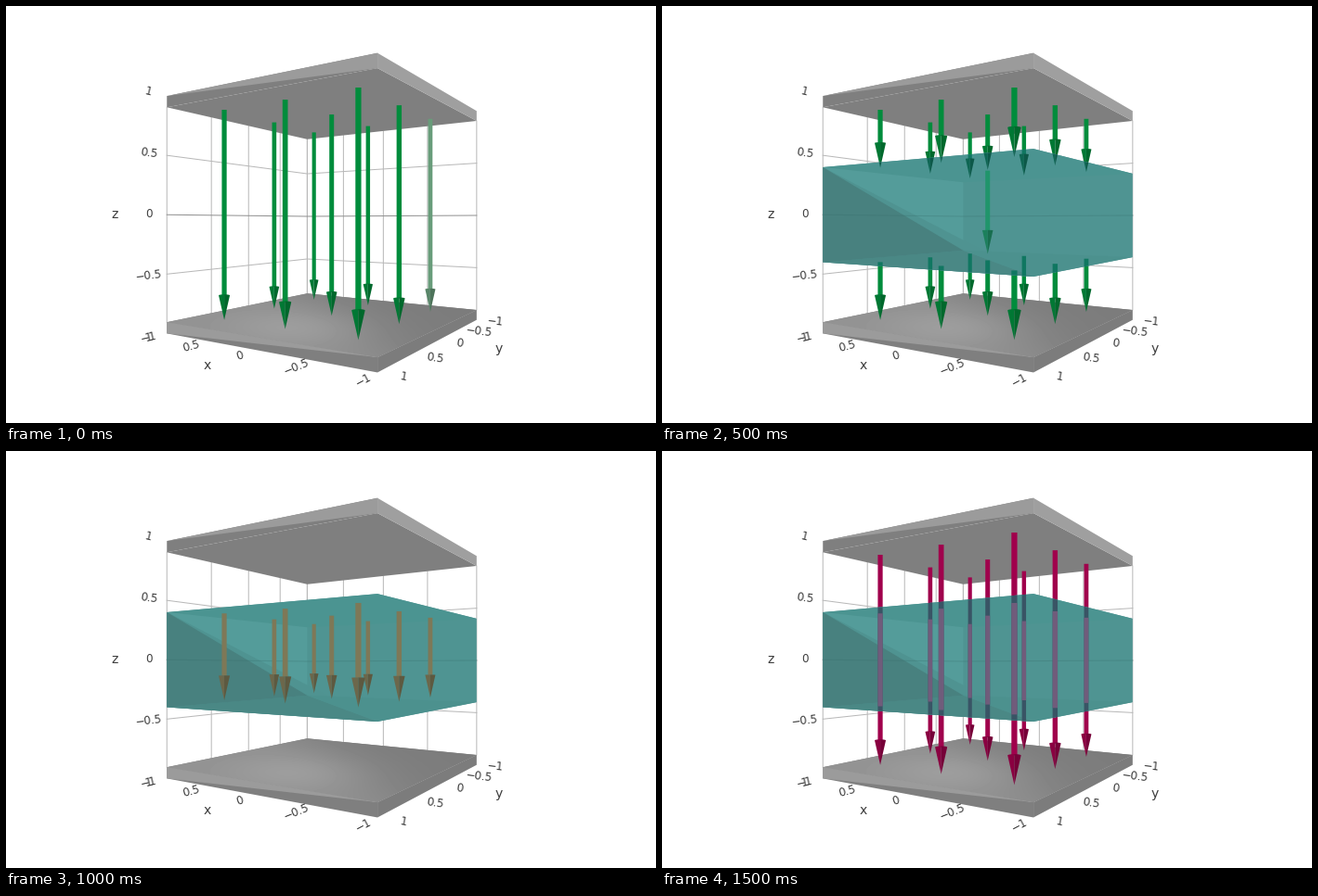
A matplotlib script for the animation above (2000 ms loop, 700x450 px).

```python
import numpy as np
import matplotlib.pyplot as plt
from matplotlib.animation import FuncAnimation
from matplotlib.colors import to_rgb
from matplotlib.patches import Polygon

W, H, DPI = 700, 450, 100
PX = 72 / DPI
PLATE = 0.905      # inner side of the plates
SLAB = 0.4         # half height of the block
CORNERS = [(1, 1), (-1, 1), (-1, -1), (1, -1)]   # left, near, right, far
TICKS = (-1, -0.5, 0, 0.5, 1)

TEAL = "#16706d"
GREEN, PALE, RED = "#008c3c", "#689c7a", "#a0004c"
BROWN, SEEN_GREEN, SEEN_RED = "#7e7857", "#20956b", "#705c7b"

fig = plt.figure(figsize=(W / DPI, H / DPI), dpi=DPI, facecolor="white")
ax = fig.add_axes([0, 0, 1, 1])


def depth(x, y):
    return 0.4611 + 0.0554 * x - 0.0849 * y


def project(x, y, z):
    """Perspective view of the scene, in pixels."""
    d = depth(x, y)
    return (350.5 + (0.1 - 46.2 * x - 30.4 * y) / d,
            231.5 - (2.7 + 55.3 * z) / d)


def mix(a, b, t):
    return tuple((1 - t) * np.array(to_rgb(a)) + t * np.array(to_rgb(b)))


def poly(points, color, z):
    patch = Polygon(points, closed=True, facecolor=color, edgecolor="none",
                    linewidth=0, zorder=z, snap=False)
    return ax.add_patch(patch)


def path(points, color, z, alpha=1.0):
    xs, ys = zip(*[project(*p) for p in points])
    return ax.plot(xs, ys, color=color, lw=PX, alpha=alpha, zorder=z,
                   snap=False)[0]


def ring(z):
    return [project(x, y, z) for x, y in CORNERS]


def draw_grid():
    for t in TICKS:
        for x, y in ((1, t), (t, -1)):
            path([(x, y, PLATE), (x, y, -PLATE)], "#b8b8b8", 1)
    for z in (-0.5, 0, 0.5):
        path([(1, 1, z), (1, -1, z), (-1, -1, z)],
             "#b8b8b8" if z else "#909090", 1)


def draw_plates():
    for sign in (1, -1):
        left, near, right, far = ring(sign * PLATE)
        left2, near2, right2, _ = ring(sign)
        poly([left, near, right, far], "#7f7f7f", 2)
        poly([left, left2, near2, near], "#7f7f7f", 2)
        poly([near, near2, right2, right],
             "#9f9f9f" if sign > 0 else "#7c7c7c", 2)
        lit = [left2, near2, near] if sign > 0 else [left, near, left2]
        poly(lit, "#9b9b9b", 2)

    # soft highlight on the lower plate
    face = poly(ring(-PLATE), "none", 2)
    x, y = np.meshgrid(np.linspace(173, 507, 334), np.linspace(310, 379, 69))
    side = 22 / (1 + np.exp((x - 370 - 1.5 * (y - 344)) / 30))
    glow = 13 * np.exp(-((x - 315) / 75) ** 2 - ((y - 346) / 20) ** 2)
    image = ax.imshow(124 + side + glow, cmap="gray", vmin=0, vmax=255,
                      extent=(173, 507, 379, 310), aspect="auto", zorder=2)
    image.set_clip_path(face)


def draw_block():
    left, near, right, far = ring(SLAB)
    left2, near2, right2, far2 = ring(-SLAB)
    outline = [left, near, right, right2, near2, left2]
    parts = [
        poly(outline, "#4f9492", 4),
        poly([left, near, right, far], "#4b9491", 4),
        poly([left, far, far2], "#549c9a", 4),
        poly([left, near2, left2], "#4f9391", 4),
        poly([left2, far2, near2], "#4a8885", 4),
        poly([far2, right2, near2], "#4c918e", 4),
        poly([left, far2, left2], "#48817f", 4),
        path([(1, 1, 0), (1, -1, 0), (-1, -1, 0)], "#356b69", 4, 0.3),
    ]
    return parts


def arrow(x, y, top, tip, color, z=3, clip=None, head=True):
    d = depth(x, y)
    cx, y0 = project(x, y, top)
    _, y1 = project(x, y, tip)
    half, rim = 1.15 / d, 2.65 / d
    neck = y1 - 11.7 / d if head else y1
    sag = rim * abs(neck - H / 2) / 543
    parts = [poly([(cx - half, y0), (cx + half, y0), (cx + half, neck),
                   (cx - half, neck)], color, z)]
    if head:
        for start, shade in ((np.pi, 0.14), (0, 0.26)):
            t = np.linspace(start, np.pi / 2, 9)
            edge = zip(cx + rim * np.cos(t), neck - sag * np.sin(t))
            parts.append(poly([*edge, (cx, y1)], mix(color, "black", shade), z))
    if clip is not None:
        for part in parts:
            part.set_clip_path(clip)
    return parts


def veiled(x, y, top, tip, color):
    """Arrow whose ends show dimly behind the block's edges."""
    return (arrow(x, y, top, tip, color)
            + arrow(x, y, top, tip, mix(color, TEAL, 0.75), 5, block[0]))


def draw_labels():
    def text(point, string, angle, size):
        ax.text(*point, string, rotation=angle, rotation_mode="default",
                fontsize=size * PX, color="#3c3c3c", family="DejaVu Sans",
                ha="center", va="center", zorder=9)

    # each axis: position along it (t) and distance from the scene (k)
    axes = {"x": lambda t, k: project(t, k, -1),
            "y": lambda t, k: project(-k, t, -1),
            "z": lambda t, k: project(1, k, t)}
    for name, place in axes.items():
        for t in TICKS:
            (x0, y0), (x1, y1) = place(t, 1), place(t, 1.18)
            angle = np.degrees(np.arctan((y0 - y1) / (x1 - x0)))
            text((x1, y1), f"{t:g}".replace("-", "−"), angle, 12)
        text(place(0, 1.48), name, 0, 14)


draw_grid()
draw_plates()
draw_labels()
block = draw_block()

thirds = (-2 / 3, 0, 2 / 3)
spots = sorted(((x, y) for x in thirds for y in thirds),
               key=lambda p: -depth(*p))
field, split, inner, total = [], [], [], []
for x, y in spots:
    edge = x < 0 and y < 0
    field += arrow(x, y, PLATE, -PLATE, PALE if edge else GREEN)
    split += veiled(x, y, PLATE, 0.407, GREEN)
    split += veiled(x, y, -0.407, -PLATE, GREEN)
    inner += arrow(x, y, SLAB, -0.348, BROWN, 5)
    total += veiled(x, y, PLATE, -PLATE, RED)
    total += arrow(x, y, SLAB, -SLAB, SEEN_RED, 5, head=False)
split += arrow(0, 0, SLAB, -0.348, SEEN_GREEN, 5)

STAGES = [field, block + split, block + inner, block + total]

ax.set_xlim(0, W)
ax.set_ylim(H, 0)
ax.axis("off")


def update(i):
    for part in field + block + split + inner + total:
        part.set_visible(False)
    for part in STAGES[i]:
        part.set_visible(True)
    return []


anim = FuncAnimation(fig, update, frames=len(STAGES), interval=500,
                     init_func=lambda: update(0), repeat=True, repeat_delay=0)
plt.show()
```
